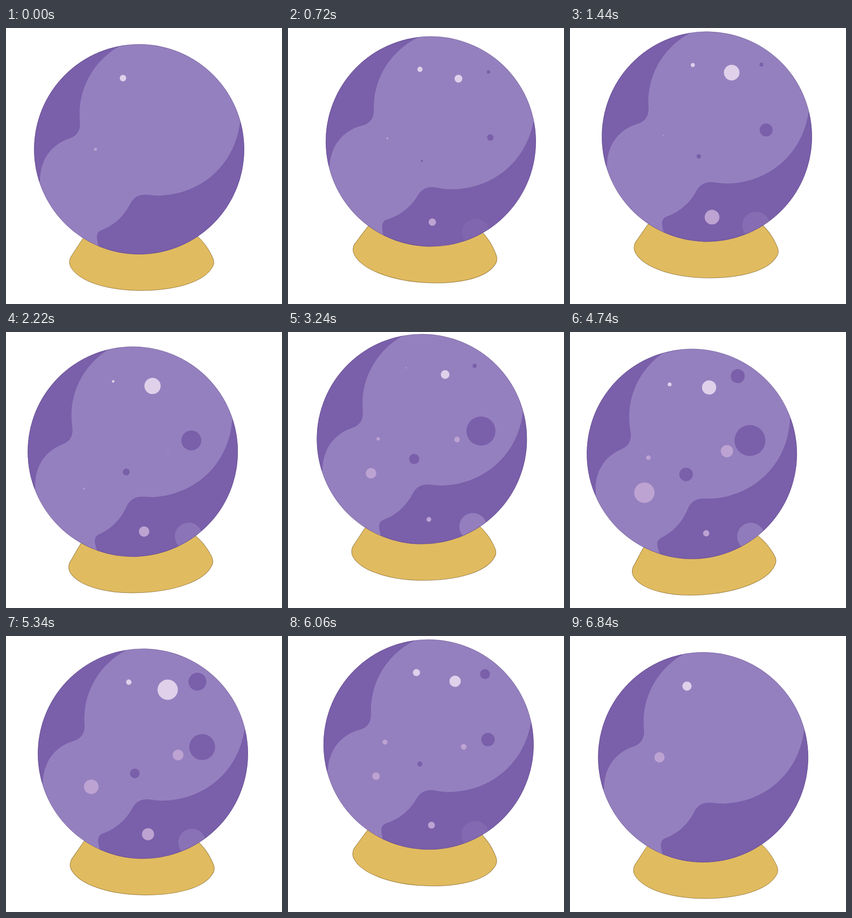
An HTML page with a canvas for the animation above (6.9 s loop, 512x512 px).

```html
<!DOCTYPE html>
<html lang="en">
<head>
<meta charset="utf-8">
<title>Crystal ball</title>
<style>
  html, body { margin: 0; width: 100%; height: 100%; overflow: hidden; background: #fff; }
  canvas { display: block; width: 512px; height: 512px; }
</style>
</head>
<body>
<canvas id="stage" width="512" height="512"></canvas>
<script>
const ctx = document.getElementById('stage').getContext('2d');
const LOOP = 6900, STEP = 60, END = 6840, LATE = 5400;
const PIVOT = { x: 250, y: 468 };
const BALL = { x: 247, y: 225, r: 194.7 };
const LIGHT = '#9580bf', DARK = '#7a5faa', PALE = '#e0d0ea', PINK = '#bda3d2', GOLD = '#e1bb60';

const base = new Path2D('M150 380L143 390C138 397 124 419 120 425C117 431 117 439 121 445' +
  'C137 471 190 487 250 487C312 487 366 472 382 445C387 438 386 431 383 425C375 408 368 399 357 388L340 370Z');
const leftShade = new Path2D('M210 34C164 60 132 112 137 172C139 190 132 200 118 205' +
  'C90 214 63 238 63 285L40 285L40 10L210 10Z');
const rightShade = new Path2D('M434 175C424 255 362 308 285 311C268 311 262 308 250 310' +
  'C238 313 233 321 229 329C216 353 196 368 177 375C168 379 166 386 172 405L172 440L460 440L460 175Z');
const ball = disc(BALL.x, BALL.y, BALL.r);

function disc(x, y, r) {
  const path = new Path2D();
  path.arc(x, y, r, 0, Math.PI * 2);
  return path;
}

// Straight rise from 0 to 1 at the peak, then straight fall back to 0.
function pulse(t, from, peak, to) {
  const k = t < peak ? (t - from) / (peak - from) : (to - t) / (to - peak);
  return Math.max(0, k);
}
const grow = (t, from) => pulse(t, from, END, LOOP);
const shrink = (t, to) => pulse(t, -1, 0, to);

// Rocks between +5 and -5 degrees, starting and ending upright.
const TURNS = [0, 850, 2610, 3795, 4745, 5640, END];
function tilt(t) {
  const last = TURNS.length - 1;
  const angle = i => i % last === 0 ? 0 : i % 2 ? 5 : -5;
  const i = TURNS.findIndex(time => t <= time) || 1;
  const k = (t - TURNS[i - 1]) / (TURNS[i] - TURNS[i - 1]);
  return (angle(i - 1) + (angle(i) - angle(i - 1)) * k) * Math.PI / 180;
}

// Three hops; the second begins before the first has landed.
const lift = t => 27 * Math.max(
  pulse(t, 0, 1304, 2355), pulse(t, 2081, 3215, 4262), pulse(t, 5062, 6192, END));

const glow = t => Math.min(1, 1.16 * pulse(t, 0, 3950, END));

function fill(path, color) {
  ctx.fillStyle = color;
  ctx.fill(path);
}

function outline(path, color) {
  ctx.lineWidth = 1;
  ctx.strokeStyle = color;
  ctx.stroke(path);
}

function bubble(x, y, color, r) {
  if (r > 0.3) fill(disc(x, y, r), color);
}

function drawBubbles(t) {
  const late = from => pulse(t, from, LATE, END);
  bubble(217, 93, PALE, Math.max(6 * shrink(t, 3730), 8.5 * grow(t, 3205)));
  bubble(289.5, 105, PALE, Math.max(18 * pulse(t, 0, 1795, 4404), 19.4 * late(3346)));
  bubble(344.2, 88.5, DARK, Math.max(5 * pulse(t, 0, 1100, 2250), 17 * late(2600)));
  bubble(356.5, 209.5, DARK, Math.min(28.7, 37.5 * pulse(t, 0, 4500, END)));
  bubble(312.3, 225.5, PINK, 12.4 * pulse(t, 2000, 4986, END));
  bubble(166, 225, PINK, Math.max(
    2.7 * shrink(t, 2330), 6.9 * pulse(t, 2330, 4380, 5330), 9.5 * grow(t, 5330)));
  bubble(233, 262, DARK, 13.4 * pulse(t, 0, 4600, END));
  bubble(153, 289, PINK, 20.5 * pulse(t, 2030, 4560, END));
  bubble(260.8, 374, PINK, Math.max(13.7 * pulse(t, 0, 1440, 4100), 11.8 * late(4100)));
}

function draw(t) {
  ctx.fillStyle = '#fff';
  ctx.fillRect(0, 0, 512, 512);
  ctx.save();
  ctx.translate(PIVOT.x, PIVOT.y - lift(t));
  ctx.rotate(tilt(t));
  ctx.translate(-PIVOT.x, -PIVOT.y);

  fill(base, GOLD);
  outline(base, 'rgba(105, 75, 15, 0.6)');
  fill(ball, LIGHT);

  ctx.save();
  ctx.clip(ball);
  fill(leftShade, DARK);
  fill(rightShade, DARK);
  ctx.globalAlpha = glow(t);
  fill(disc(342.7, 387, 25.5), LIGHT);
  ctx.restore();

  outline(ball, 'rgba(80, 58, 125, 0.5)');
  drawBubbles(t);
  ctx.restore();
}

const start = performance.now();
function tick() {
  const t = Math.max(0, performance.now() - start) % LOOP;
  draw(Math.floor(t / STEP) * STEP);
  requestAnimationFrame(tick);
}
tick();
</script>
</body>
</html>
```
